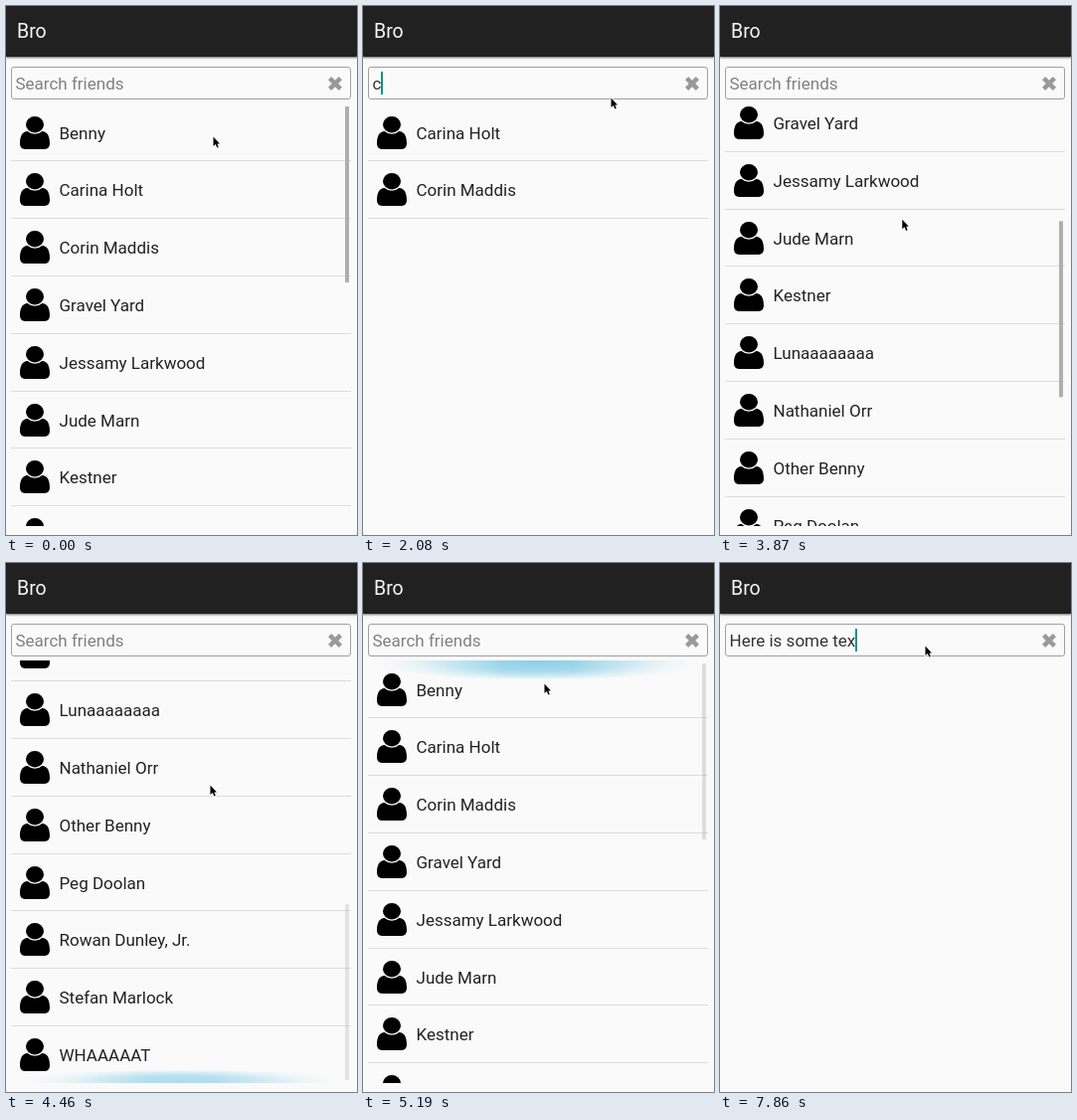
An HTML page for the animation above (8 s loop, 353 by 532 pixels).

```html
<!DOCTYPE html>
<html lang="en">
<head>
<meta charset="utf-8">
<title>Friend search</title>
<style>
  html, body { margin: 0; width: 100%; height: 100%; overflow: hidden; background: #fafafa; }
  body { position: relative; font: 17px Roboto, sans-serif; color: #222; }
  body > *, #list > * { position: absolute; }
  header {
    left: 0; top: 0; width: 100%; height: 51px; box-sizing: border-box; padding-left: 11px;
    background: #212121; color: #f6f6f6; font-size: 19.5px; line-height: 52px;
    box-shadow: 0 1px 2px rgba(0, 0, 0, .6);
  }
  #field {
    left: 5px; top: 61px; width: 342px; height: 33px; box-sizing: border-box;
    border: 1px solid #9f9f9f; border-radius: 3px;
  }
  #text { left: 9.5px; top: 61px; line-height: 34px; white-space: pre; color: #333; }
  #text.hint { color: #808080; }
  #caret { top: 66px; width: 2px; height: 22.5px; background: #009688; }
  #clear { left: 324px; top: 70.5px; }
  #list { left: 5px; top: 98px; width: 342px; height: 425px; overflow: hidden; }
  #rows { left: 0; top: .6px; width: 100%; }
  .row {
    position: relative; height: 57.8px; box-sizing: border-box; padding-left: 48.5px;
    border-bottom: 1px solid #dcdcdc; line-height: 58px; white-space: nowrap;
  }
  .row svg { position: absolute; left: 9px; top: 12px; }
  #bar { left: 336px; top: 3px; width: 3.5px; height: 177px; background: #afafaf; }
  .glow {
    left: 0; width: 100%; height: 20px;
    mask-image: linear-gradient(90deg, transparent 3%, #000 40%, #000 60%, transparent 97%);
  }
  #topGlow {
    top: 0; transform-origin: top;
    background: radial-gradient(ellipse 54% 100% at 50% 0, #8fcfe6, #a5d9eb 55%, #d5edf5 85%, transparent);
  }
  #endGlow {
    bottom: 0; transform-origin: bottom;
    background: radial-gradient(ellipse 54% 100% at 50% 100%, #a2d9ee, #b5e0f0 55%, #dcf0f8 85%, transparent);
  }
  #pointer { left: 0; top: 0; overflow: visible; }
</style>
</head>
<body>
<header>Bro</header>
<div id="field"></div>
<div id="text"></div>
<div id="caret"></div>
<svg id="clear" width="14" height="14"><path d="M1.6 1.6 12.4 12.4M12.4 1.6 1.6 12.4" stroke="#999" stroke-width="4.5"/></svg>
<div id="list">
  <div id="rows"></div>
  <div id="topGlow" class="glow"></div>
  <div id="endGlow" class="glow"></div>
  <div id="bar"></div>
</div>
<svg id="pointer" width="8" height="13"><path d="M.5.5V10L2.8 8 4.3 11.6 5.8 11 4.4 7.5H7Z" stroke="#fff" stroke-width="1.6" paint-order="stroke"/></svg>
<svg width="0" height="0">
  <symbol id="person" viewBox="0 0 30 33">
    <ellipse cx="15" cy="8.250" rx="9" ry="8.250"/>
    <path d="M22.300 15.100C27.500 15.100 30 20 30 27.300 30 30.800 28 33 25 33H5C2 33 0 30.800 0 27.300 0 20 2.500 15.100 7.700 15.100Q10.700 17.850 15 17.850T22.300 15.100Z"/>
  </symbol>
</svg>
<script>
const LOOP = 8000, STEP = 148.3, SCROLL_END = 384, BAR_TRAVEL = 242, TYPING = 6680;
const names = ['Benny', 'Carina Holt', 'Corin Maddis', 'Gravel Yard', 'Jessamy Larkwood',
  'Jude Marn', 'Kestner', 'Lunaaaaaaaa', 'Nathaniel Orr', 'Other Benny', 'Peg Doolan',
  'Rowan Dunley, Jr.', 'Stefan Marlock', 'WHAAAAAT'];
const phrase = 'Here is some tex';

// Taps and keystrokes, with the query each one leaves in the field
const inputs = [[150, ''], [880, 'b'], [1480, ''], [2080, 'c'], [2820, ''], [5790, '']];

// Pointer stops: [ms, x, y]
const stops = [[0, 208, 131], [150, 249, 92], [3120, 249, 92], [3570, 167, 322], [4010, 189, 172],
  [4460, 205, 223], [4760, 199, 250], [5190, 182, 121], [5490, 289, 90], [5790, 206, 83]];

const $ = id => document.getElementById(id);

// Smooth 0 to 1 between two times
function ramp(t, from, to) {
  const p = Math.min(1, Math.max(0, (t - from) / (to - from)));
  return p * p * (3 - 2 * p);
}
const flash = (t, on, hold, off) => t < on ? 0 : 1 - ramp(t, hold, off);
const bump = (t, mid, reach) => Math.max(0, 1 - ((t - mid) / reach) ** 2);

$('rows').innerHTML = names.map(name =>
  `<div class="row"><svg width="30" height="33"><use href="#person"/></svg>${name}</div>`).join('');
const rows = [...$('rows').children];

function inputAt(t) {
  if (t >= TYPING) return [t, phrase.slice(0, 1 + 2 * Math.floor((t - TYPING + 4) / 148))];
  return inputs.findLast(([time]) => time <= t) || [-LOOP, ''];
}

function pointerAt(t) {
  const i = stops.findLastIndex(([time]) => time <= t);
  const [from, x, y] = stops[i];
  const [to, nextX, nextY] = stops[i + 1] || [LOOP, x, y];
  const p = ramp(t, from, to);
  return [x + (nextX - x) * p, y + (nextY - y) * p];
}

let shown = null;
function showText(query) {
  if (query === shown) return;
  shown = query;
  const text = $('text');
  text.textContent = query || 'Search friends';
  text.className = query ? '' : 'hint';
  $('caret').style.left = (query ? 9 + text.getBoundingClientRect().width : 9.5) + 'px';
  rows.forEach((row, i) => {
    row.style.display = names[i].toLowerCase().startsWith(query.toLowerCase()) ? '' : 'none';
  });
}

function pull(id, amount) {
  $(id).style.opacity = Math.min(1, amount * 1.4);
  $(id).style.transform = `scaleY(${amount})`;
}

function draw(t) {
  const [touched, query] = inputAt(t);
  showText(query);
  $('caret').style.opacity = t - touched < 440 ? 1 : 0;

  // Movement is held for one step at a time
  const q = Math.floor((t + 4) / STEP) * STEP;
  const [x, y] = pointerAt(q);
  const scroll = ramp(q, 3570, 4160) - ramp(q, 4610, 5040);
  $('pointer').style.transform = `translate(${x}px, ${y}px)`;
  $('rows').style.transform = `translateY(${-Math.round(scroll * SCROLL_END)}px)`;
  $('bar').style.transform = `translateY(${scroll * BAR_TRAVEL}px)`;
  $('bar').style.opacity = Math.max(
    flash(q, 0, 300, 590), flash(q, 3700, 4160, 4620), flash(q, 4740, 4900, 5400));
  pull('topGlow', bump(q, 5150, 250));
  pull('endGlow', bump(q, 4310, 240));
}

const start = performance.now();
function tick() {
  draw((performance.now() - start) % LOOP);
  requestAnimationFrame(tick);
}
tick();
</script>
</body>
</html>
```
